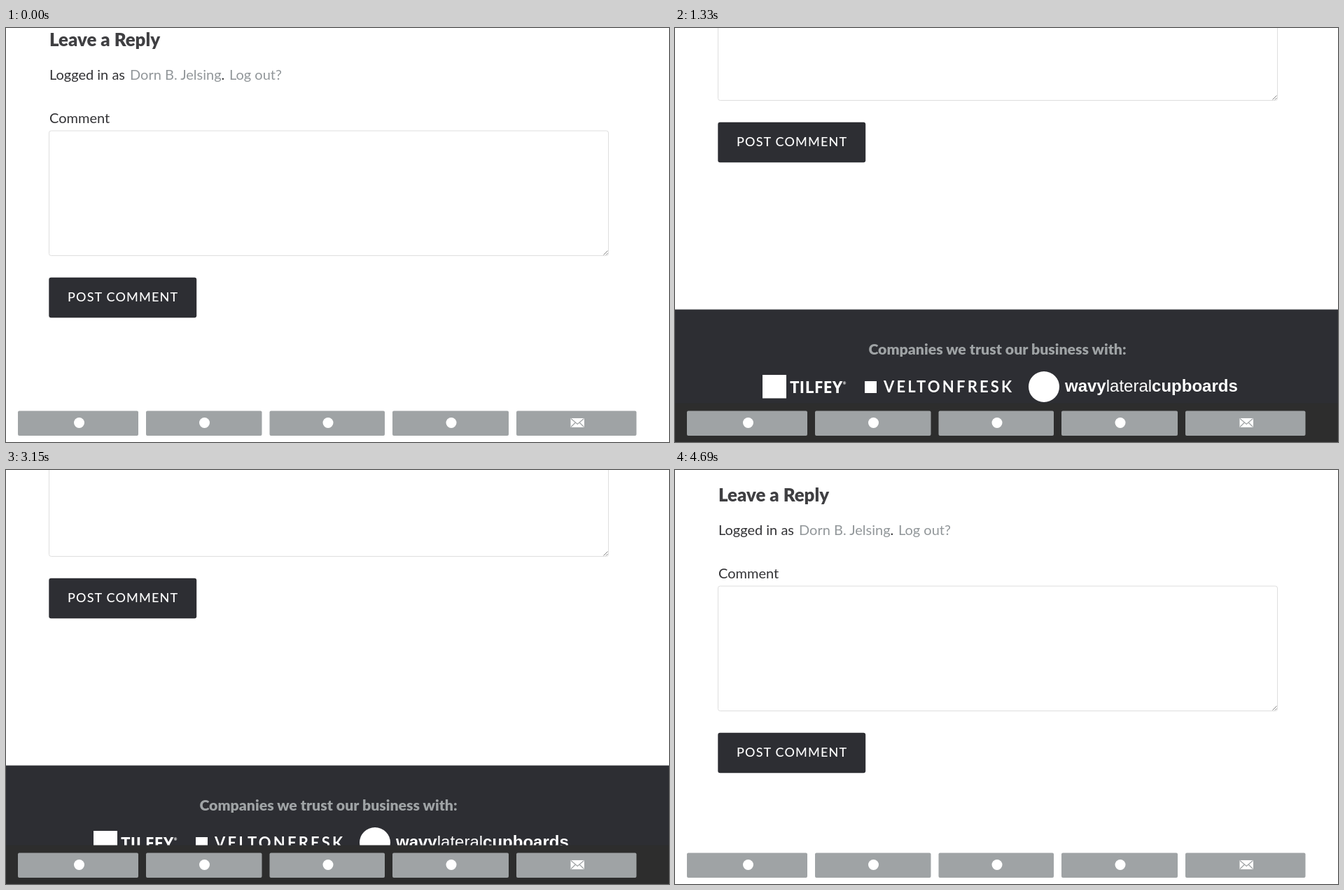
These frames come from a looping animation (947x592 px, 5320 ms). An HTML page:

```html
<!DOCTYPE html>
<html lang="en">
<head>
<meta charset="utf-8">
<title>Floating share bar</title>
<style>
  html, body { margin: 0; width: 100%; height: 100%; overflow: hidden; background: #fff; }
  svg { display: block; }
  text { font-family: Lato, sans-serif; font-size: 20px; fill: #333336; white-space: pre; }
  .link { fill: #92979a; }
  .dark { fill: #2d2e33; }
  .grey { fill: #9fa3a5; }
  .white { fill: #fff; }
  .title { font-size: 25.8px; font-weight: 900; fill: #3f3f42; }
  .button { font-size: 18px; font-weight: 500; letter-spacing: 1.15px; }
  .trust { font-size: 21.3px; font-weight: 900; }
  .copyright { font-size: 12.8px; }
  .narrow { font: bold 23.5px "Open Sans", sans-serif; }
  .spaced { font-size: 22px; font-weight: 700; letter-spacing: 3.2px; }
  .plain { font: 24px "Liberation Sans", sans-serif; }
  .bold { font-weight: bold; }
</style>
</head>
<body>
<svg width="947" height="592" viewBox="0 0 947 592">
  <g id="page">
    <text class="title" x="62" y="26">Leave a Reply</text>
    <text x="62" y="74">Logged in as <tspan class="link" x="177">Dorn B. Jelsing</tspan>. <tspan class="link" x="319">Log out?</tspan></text>
    <text x="62" y="136">Comment</text>
    <rect x="61.5" y="147" width="799" height="178.5" rx="3" fill="#fff" stroke="#dedede"/>
    <path d="M853.5 324.5l6-6m-2.5 6l2.5-2.5" stroke="#777" stroke-width=".9"/>
    <rect class="dark" x="61.3" y="356.7" width="210.9" height="57.6" rx="3"/>
    <text class="button white" x="88" y="391">POST COMMENT</text>

    <g transform="translate(0 624.5)">
      <rect class="dark" width="947" height="400"/>
      <text class="trust grey" x="460.5" y="64.5" text-anchor="middle">Companies we trust our business with:</text>
      <rect class="white" x="125" y="93.5" width="34" height="33.5"/>
      <text class="narrow white" x="164" y="119">TILFEY<tspan font-size="6" dy="-12">®</tspan></text>
      <rect class="white" x="271" y="102.5" width="17" height="17"/>
      <text class="spaced white" x="298" y="118.5">VELTONFRESK</text>
      <circle class="white" cx="527" cy="110.5" r="22"/>
      <text class="plain white" x="557" y="117.5"><tspan class="bold">wavy</tspan>lateral<tspan class="bold">cupboards</tspan></text>
      <text class="copyright grey" x="461" y="165.5" text-anchor="middle">Copyright © 2015 · Dorn B. Jelsing. A project by QV Fendos, LLC.</text>
    </g>
  </g>

  <rect id="bar" y="536.5" width="947" height="56"/>
  <g class="grey">
    <rect x="17" y="547.5" width="172" height="35.5" rx="2"/>
    <rect x="200" y="547.5" width="165.5" height="35.5" rx="2"/>
    <rect x="376.5" y="547.5" width="164.5" height="35.5" rx="2"/>
    <rect x="552" y="547.5" width="166" height="35.5" rx="2"/>
    <rect x="729" y="547.5" width="171.5" height="35.5" rx="2"/>
  </g>
  <g class="white">
    <circle cx="104.5" cy="564.5" r="7.5"/>
    <circle cx="283.5" cy="564.5" r="7.5"/>
    <circle cx="460" cy="564.5" r="7.5"/>
    <circle cx="636" cy="564.5" r="7.5"/>
    <rect x="806.5" y="558" width="19.5" height="13"/>
  </g>
  <path d="M807 558.5l9.25 8 9.25-8M807 570.5l6-6m12.5 6l-6-6" fill="none" stroke="#9fa3a5" stroke-width="1.2"/>
</svg>
<script>
const LOOP = 5320, STEP = 70;

// Scroll gestures; a skew below 1 moves the fastest part towards the start.
const FLICKS = [
  { from: 420, to: 1540, distance: 228, skew: 0.55 },
  { from: 1540, to: 1680, distance: 77, skew: 1 },
  { from: 2240, to: 2870, distance: -102, skew: 0.87 },
  { from: 3125, to: 4690, distance: -222, skew: 0.76 }
];

const progress = (t, from, to) => Math.min(1, Math.max(0, (t - from) / (to - from)));
const ease = (p, skew) => (1 - Math.cos(Math.PI * p ** skew)) / 2;

const scrollAt = t => FLICKS.reduce((sum, { from, to, distance, skew }) =>
  sum + distance * ease(progress(t, from, to), skew), 0);

// The bar darkens when the footer slides under it and fades back to white later.
function barColor(t) {
  const darkness = progress(t, 630, 840) - progress(t, 3640, 4060);
  const mix = (white, grey, dark) => Math.round(darkness < 0.5
    ? white + (grey - white) * darkness * 2
    : grey + (dark - grey) * (darkness * 2 - 1));
  return `rgb(${mix(255, 159, 45)}, ${mix(255, 163, 45)}, ${mix(255, 165, 45)})`;
}

const page = document.getElementById("page");
const bar = document.getElementById("bar");
const start = performance.now();

function draw(now) {
  const t = Math.floor(Math.max(0, now - start) % LOOP / STEP) * STEP;
  page.setAttribute("transform", `translate(0 ${-Math.round(scrollAt(t))})`);
  bar.setAttribute("fill", barColor(t));
  requestAnimationFrame(draw);
}
draw(start);
</script>
</body>
</html>
```
